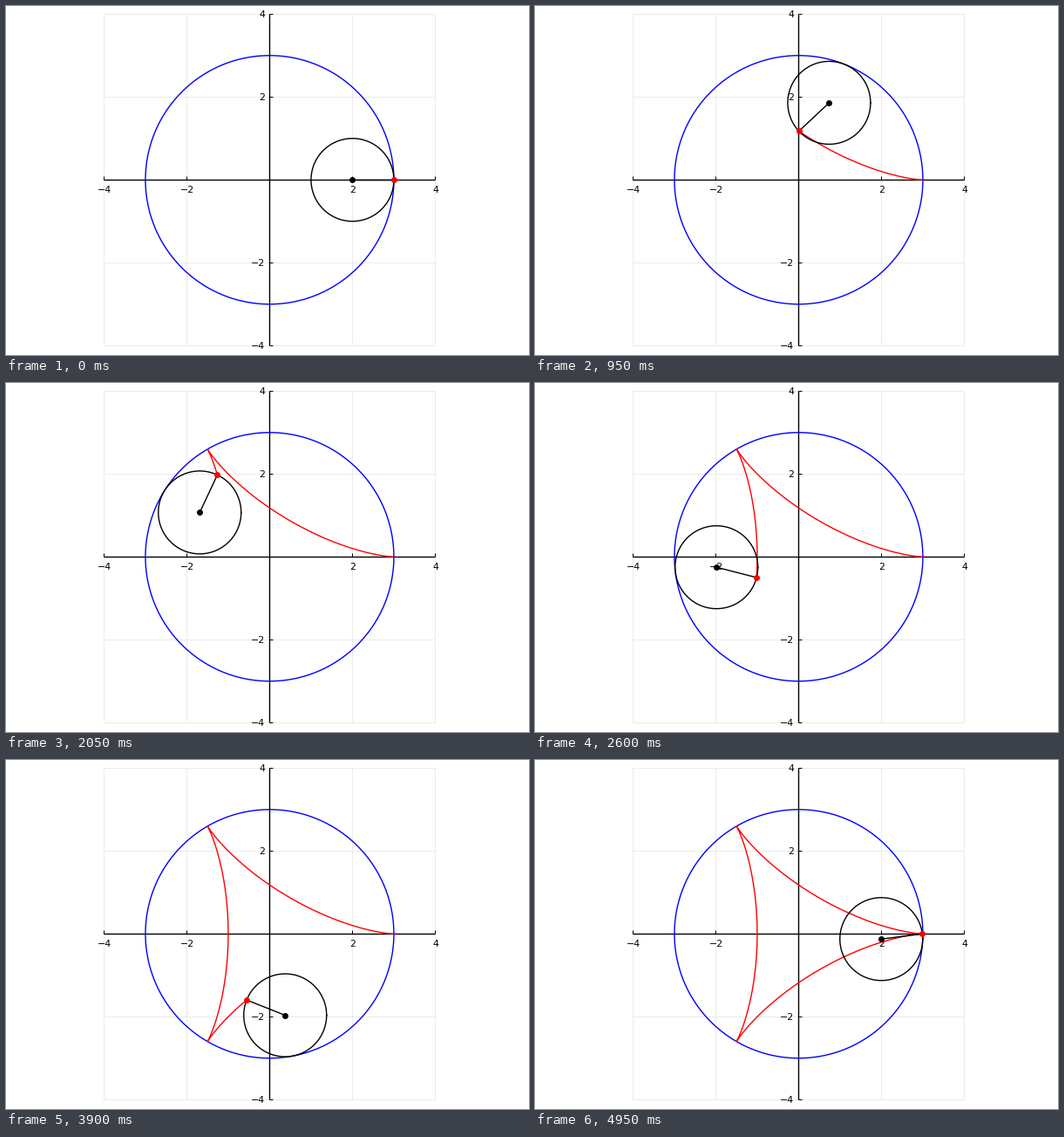
These frames come from a looping animation (600 by 400 pixels, 5 s). A matplotlib script:

```python
import numpy as np
import matplotlib.pyplot as plt
from matplotlib.animation import FuncAnimation

WIDTH, HEIGHT, DPI = 600, 400, 100
FRAMES, INTERVAL = 100, 50
PX = 72 / DPI                     # one pixel in points
CX, CY, UNIT = 302.45, 199.25, 47.5
LINE = 1.4 * PX
LIMIT = 4
BIG, SMALL = 3, 1

plt.rcParams["font.family"] = "DejaVu Sans"
fig = plt.figure(figsize=(WIDTH / DPI, HEIGHT / DPI), dpi=DPI, facecolor="white")
ax = fig.add_axes([0, 0, 1, 1])
ax.set_xlim(0, WIDTH)
ax.set_ylim(HEIGHT, 0)
ax.axis("off")


def to_px(x, y):
    return CX + UNIT * np.asarray(x), CY - UNIT * np.asarray(y)


def draw(x, y, color="black", width=LINE, **style):
    return ax.plot(*to_px(x, y), color=color, lw=width, **style)[0]


def dot(color):
    return draw([], [], color, ls="none", marker="o", ms=7 * PX, mew=0, zorder=6)


def circle(radius, x=0, y=0):
    a = np.linspace(0, 2 * np.pi, 361)
    return x + radius * np.cos(a), y + radius * np.sin(a)


def center(t):
    r = BIG - SMALL
    return r * np.cos(t), r * np.sin(t)


def pen(t):
    x, y = center(t)
    spin = (BIG - SMALL) / SMALL * t
    return x + SMALL * np.cos(spin), y - SMALL * np.sin(spin)


def draw_axes():
    span = [-LIMIT, LIMIT]
    tick = 4 / UNIT
    for v in (-4, -2, 2, 4):
        draw([v, v], span, "#ebebeb", PX, zorder=1)
        draw(span, [v, v], "#ebebeb", PX, zorder=1)
        draw([v, v], [0, tick], width=PX, solid_capstyle="butt")
        draw([0, tick], [v, v], width=PX, solid_capstyle="butt")
        label = str(v).replace("-", "\u2212")
        x, y = to_px(v, v)
        ax.text(x, CY + 15, label, size=11 * PX, ha="center", va="baseline")
        ax.text(CX - 5.3, y + 4.2, label, size=11 * PX, ha="right", va="baseline")
    draw(span, [0, 0], solid_capstyle="butt")
    draw([0, 0], span, solid_capstyle="butt")


draw_axes()
draw(*circle(BIG), color="blue", zorder=4)
trail = draw([], [], "red", zorder=4, solid_joinstyle="round")
wheel = draw([], [], zorder=4)
arm = draw([], [], zorder=5)
hub = dot("black")
tip = dot("red")


def update(k):
    t = 2 * np.pi * k / FRAMES
    x, y = center(t)
    px, py = pen(t)
    trail.set_data(*to_px(*pen(np.linspace(0, t, 4 * k + 1))))
    wheel.set_data(*to_px(*circle(SMALL, x, y)))
    arm.set_data(*to_px([x, px], [y, py]))
    hub.set_data(*to_px([x], [y]))
    tip.set_data(*to_px([px], [py]))
    return trail, wheel, arm, hub, tip


anim = FuncAnimation(fig, update, frames=FRAMES, interval=INTERVAL,
                     repeat=True, repeat_delay=0, blit=False)
plt.show()
```
